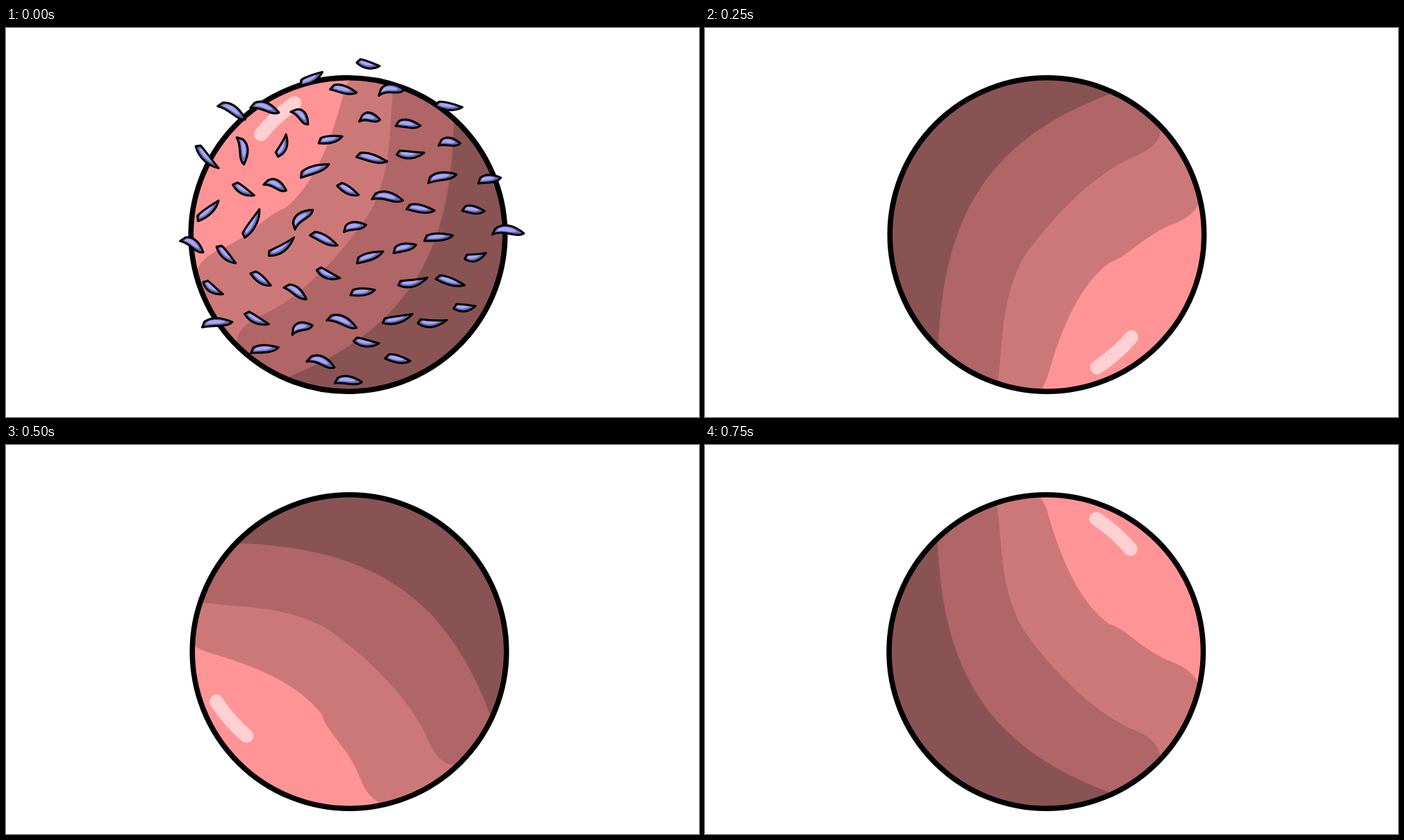
An HTML page with a canvas for the animation above (870 ms loop, 998 by 561 pixels).

```html
<!DOCTYPE html>
<html lang="en">
<head>
<meta charset="utf-8">
<title>Spinning ball</title>
<style>
  html, body { margin: 0; width: 100%; height: 100%; overflow: hidden; background: #fff; }
  canvas { display: block; }
</style>
</head>
<body>
<canvas id="stage" width="998" height="561"></canvas>
<script>
const ctx = document.getElementById('stage').getContext('2d');
const CX = 492.5, CY = 298, RADIUS = 226.2;
const LOOP = 870, FLAKES = 58;

const disc = new Path2D();
disc.arc(CX, CY, RADIUS, 0, 2 * Math.PI);

// Each lighter shade covers everything to the lower right of its edge
const shade = (color, edge) => ({ color, path: new Path2D(edge + 'L760 60V600Z') });
const shades = [
  shade('#b06567', 'M336 600V460C343 263 414 156 592 92L620 80'),
  shade('#cd7878', 'M416 545L421 515C430 450 425 400 455 338C475 303 550 212 622 184Q653 170 656 150L660 120'),
  shade('#ff9496', 'M475 530Q490 520 497 490C515 430 540 370 583 338C610 330 630 300 674 283Q708 270 714 245')
];
const highlight = new Path2D('M614 446Q594 470 564.5 489.5');

const start = { x: 492.5, angle: Math.PI - 0.026, flip: 1 };
const spin = [
  { x: 494.5, angle: Math.PI / 2, flip: 1 },
  { x: 492.5, angle: 0, flip: 1 },
  { x: 491.3, angle: 0, flip: -1 }
];

let seed = 7;
function random(min, max) {
  seed = (seed * 16807) % 2147483647;
  return min + (max - min) * seed / 2147483647;
}

// Sunflower spacing; tilts are wild at the upper left and nearly flat elsewhere
const flakes = Array.from({ length: FLAKES }, (_, i) => {
  const reach = 237 * Math.sqrt((i + 0.5) / FLAKES);
  const turn = i * Math.PI * (3 - Math.sqrt(5));
  const x = 486 + reach * Math.cos(turn) + random(-6, 6);
  const y = 281 + reach * Math.sin(turn) + random(-6, 6);
  const wildness = Math.exp(-((x - 340) ** 2 + (y - 220) ** 2) / 25000);
  const tilt = 0.06 + random(-1, 1) * (0.25 + 1.2 * wildness);
  return { x, y, tilt, outline: flakeOutline(random(15, 23), random(-3, 4)) };
});

function flakeOutline(h, bend) {
  const path = new Path2D();
  path.moveTo(-h, 3 + bend);
  path.lineTo(-h + 4, -4 + bend / 2);
  path.bezierCurveTo(-h / 3, -7 - bend, h / 3, -5 - bend, h, -1 + bend);
  path.bezierCurveTo(h / 2, 7 + bend, -h / 4, 6 - 2 * bend, -h, 3 + bend);
  path.closePath();
  return path;
}

function drawBall({ x, angle, flip }) {
  ctx.save();
  ctx.translate(x, CY);
  ctx.rotate(angle);
  ctx.scale(1, flip);
  ctx.translate(-CX, -CY);

  ctx.save();
  ctx.clip(disc);
  ctx.fillStyle = '#895354';
  ctx.fill(disc);
  for (const { color, path } of shades) {
    ctx.fillStyle = color;
    ctx.fill(path);
  }
  ctx.restore();

  ctx.lineCap = 'round';
  ctx.strokeStyle = '#ffd0d1';
  ctx.lineWidth = 20;
  ctx.stroke(highlight);
  ctx.strokeStyle = '#000';
  ctx.lineWidth = 7.6;
  ctx.stroke(disc);
  ctx.restore();
}

function drawFlake({ x, y, tilt, outline }) {
  ctx.save();
  ctx.translate(x, y);
  ctx.rotate(tilt);
  ctx.lineJoin = 'round';
  ctx.fillStyle = '#6769b2';
  ctx.fill(outline);

  ctx.save();
  ctx.translate(-2, -1);
  ctx.scale(0.65, 0.5);
  ctx.fillStyle = '#a6a7f6';
  ctx.fill(outline);
  ctx.restore();

  ctx.strokeStyle = '#000';
  ctx.lineWidth = 3;
  ctx.stroke(outline);
  ctx.restore();
}

function draw() {
  const t = performance.now() % LOOP;
  // Poses last 125 ms, rounded to whole hundredths of a second
  const step = Math.floor(Math.floor(t / 10) / 12.5);
  ctx.fillStyle = '#fff';
  ctx.fillRect(0, 0, 998, 561);
  drawBall(step ? spin[(step - 1) % 3] : start);
  if (!step) flakes.forEach(drawFlake);
  requestAnimationFrame(draw);
}
draw();
</script>
</body>
</html>
```
